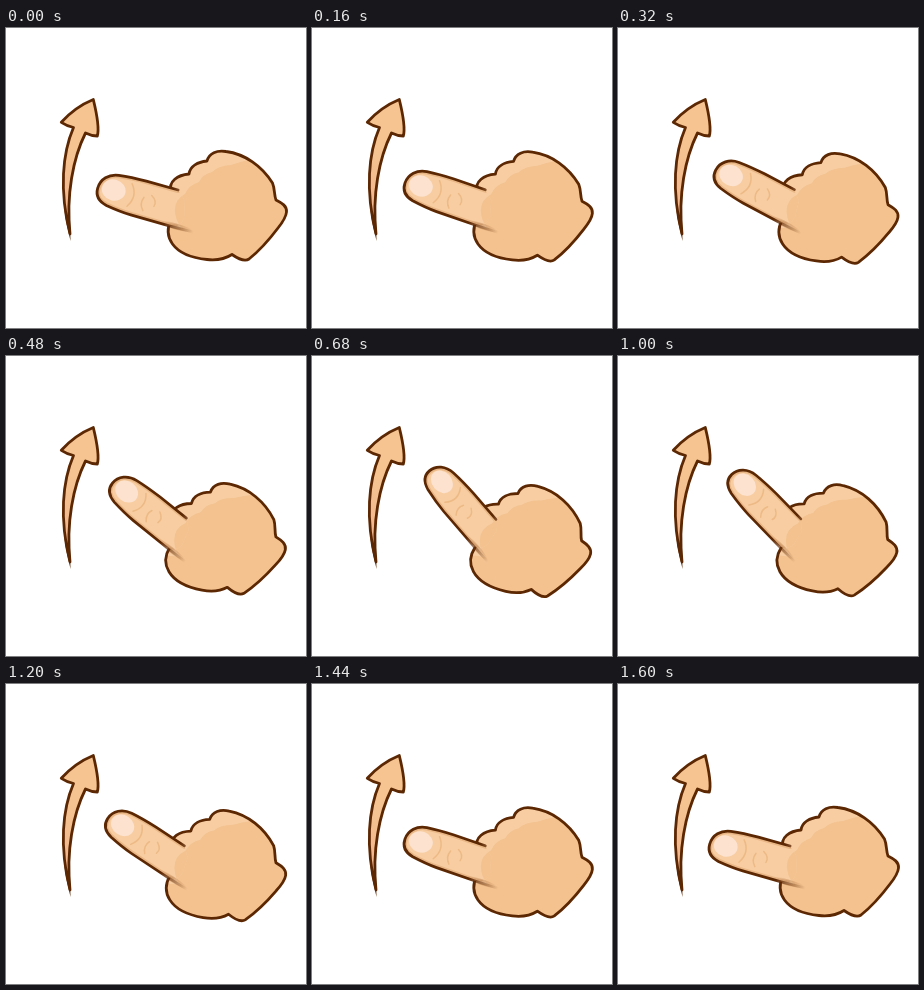
Recreate the animation shown at these times as an HTML page with a canvas. Size 300 px wide and 300 px high, loop 1800 ms.

```html
<!DOCTYPE html>
<html lang="en">
<head>
<meta charset="utf-8">
<title>Swipe up</title>
<style>
html, body { margin: 0; width: 100%; height: 100%; overflow: hidden; background: #fff; }
canvas { display: block; width: 300px; height: 300px; }
</style>
</head>
<body>
<canvas id="stage"></canvas>
<script>
const canvas = document.getElementById('stage');
const ctx = canvas.getContext('2d');
const ratio = window.devicePixelRatio || 1;
canvas.width = canvas.height = 300 * ratio;

const LOOP = 1800, SWING = 1600, STEP = 40;
const RAD = Math.PI / 180;
const LINE = '#5c2703', SKIN = '#f3c28f', LIGHT = '#f7cda1';
const LINE_WIDTH = 2.8;

const arrow = new Path2D(`M87.3 71.5 Q69 79 55.3 94.3 Q61 98 67.5 99.5
  C56.5 125 53 162 64 206 C60 167 67 130 79.5 105 Q85 107.8 91.3 108 Q94 99 87.3 71.5 Z`);
const arrowTail = new Path2D('M58 180 Q60 196 64.5 213 Q64 196 64 180 L61 190 Z');

const handShape = `M165 164 C162 153 172 147 183 146 C184 138 192 134 201 133
  C203 125 211 122 220 123.5 C239 126 256 138 266.5 155 C269 161 268 167 270 172
  C276 175 281 178 280.5 184 C280 190 276 195 272 200 C263 212 253 223 243 231
  C238 234.5 231 230 226 226.5 C219 231 210 232.5 201 231.5 C186 230 173 225 166.5 216
  C161.5 209 161 200 165 192`;
const handLine = new Path2D(handShape);
const hand = new Path2D(handShape + 'Z');
const palm = new Path2D(`M300 130 L243 132 Q233 134 225 137 Q212 138 206 144
  Q197 146 193 154 Q183 157 179 166 Q168 172 169 184 Q170 194 176 200
  L150 200 L150 245 L300 245 Z`);

// Finger coordinates: origin at the knuckle, tip towards negative x.
const fingerEdge = `M-7 -18.3 L-40 -18.4 C-52 -18.2 -60 -17.6 -68 -16.6
  C-78 -15.3 -85 -8 -85 1.5 C-85 10 -80.5 14 -72 15.8 C-62 17.4 -54 18.2 -46 18.4 L-6 18.6`;
const fingerLine = new Path2D(fingerEdge + 'L19 18.2');
const finger = new Path2D(fingerEdge + 'Q6 18 6 6 L2 -10 Z');
const creases = new Path2D(`M-53 -12 Q-44 -1 -52 11
  M-38 -2 Q-41 5 -35.5 11 M-31 -6 Q-24 -2 -26 4`);

const edgeFade = ctx.createLinearGradient(-12, 0, 19, 0);
edgeFade.addColorStop(0, LINE);
edgeFade.addColorStop(0.4, 'rgba(92,39,3,.45)');
edgeFade.addColorStop(1, 'rgba(92,39,3,0)');

const shadow = ctx.createLinearGradient(-16, 0, 18, 0);
shadow.addColorStop(0, 'rgba(150,85,35,0)');
shadow.addColorStop(0.5, 'rgba(150,85,35,.3)');
shadow.addColorStop(1, 'rgba(150,85,35,0)');

function stroke(path, style, width) {
  ctx.strokeStyle = style;
  ctx.lineWidth = width;
  ctx.stroke(path);
}

function fill(path, style) {
  ctx.fillStyle = style;
  ctx.fill(path);
}

function fillEllipse(x, y, rx, ry, style) {
  const path = new Path2D();
  path.ellipse(x, y, rx, ry, 0, 0, 2 * Math.PI);
  fill(path, style);
}

function scoped(draw) {
  ctx.save();
  draw();
  ctx.restore();
}

function turnHand(lift) {
  ctx.translate(167, 175);
  ctx.rotate(7.5 * lift * RAD);
  ctx.translate(-167, -175);
}

// The finger turns at the knuckle and gets slimmer as it rises.
function turnFinger(lift) {
  ctx.translate(174, 181.5);
  ctx.rotate((15.5 + 35.4 * lift) * RAD);
  ctx.translate(0, -2.5 * lift);
  ctx.scale(1 + 0.03 * lift, 1 - 0.07 * lift);
}

function drawArrow() {
  const tint = ctx.createLinearGradient(0, 120, 0, 190);
  tint.addColorStop(0, '#f5c491');
  tint.addColorStop(1, '#f2b48c');
  fill(arrow, tint);
  stroke(arrow, LINE, LINE_WIDTH);
  fill(arrowTail, LINE);
}

function drawHand(lift) {
  scoped(() => {
    turnHand(lift);
    fill(hand, LIGHT);
    scoped(() => { ctx.clip(hand); fill(palm, SKIN); });
    stroke(handLine, LINE, LINE_WIDTH);
  });
}

function drawFinger(lift) {
  scoped(() => {
    turnFinger(lift);
    fill(finger, LIGHT);
    ctx.clip(finger);
    stroke(fingerLine, 'rgba(190,115,55,.25)', 6);
    ctx.setTransform(ratio, 0, 0, ratio, 0, 0);
    turnHand(lift);
    fill(palm, SKIN);
  });
  scoped(() => {
    turnFinger(lift);
    fillEllipse(1, 17.5, 17, 3, shadow);
    stroke(creases, '#edba86', 1.5);
    fillEllipse(-69, -1, 12, 10.6, '#fce2cf');
    stroke(fingerLine, edgeFade, LINE_WIDTH);
  });
}

function render(now) {
  const time = Math.floor((now % LOOP) / STEP) * STEP;
  const lift = (1 - Math.cos(2 * Math.PI * Math.min(time, SWING) / SWING)) / 2;
  ctx.setTransform(ratio, 0, 0, ratio, 0, 0);
  ctx.fillStyle = '#fff';
  ctx.fillRect(0, 0, 300, 300);
  ctx.lineJoin = 'round';
  ctx.lineCap = 'round';
  drawArrow();
  drawHand(lift);
  drawFinger(lift);
}

let start;
function tick(now) {
  start ??= now;
  render(now - start);
  requestAnimationFrame(tick);
}
render(0);
requestAnimationFrame(tick);
</script>
</body>
</html>
```
